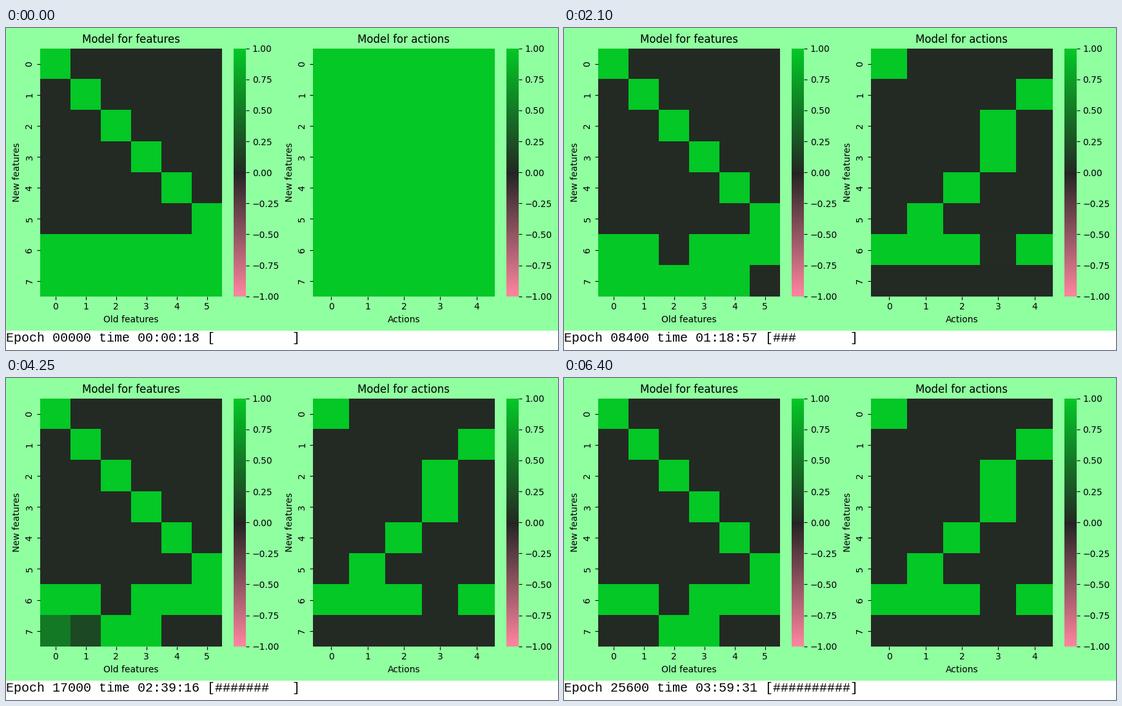
A matplotlib script that plays this animation: 856 by 500 pixels, repeating every 6450 ms.

```python
import numpy as np
import matplotlib.pyplot as plt
from matplotlib.animation import FuncAnimation
from matplotlib.colors import LinearSegmentedColormap
from matplotlib.patches import Rectangle

W, H, DPI = 856, 500, 100
FRAMES, STEP_MS = 129, 50
EPOCHS_PER_FRAME = 200
STRIP = 30                   # height of the white status strip
TOP, BOTTOM = 31.71, 416.71  # vertical extent of both heatmaps
MAP_W, BAR_GAP, BAR_W = 282, 17.6, 19.25
LIMIT = 5.0                  # gates saturate at this logit

CMAP = LinearSegmentedColormap.from_list(
    "gate", [(0, "#ff85a0"), (0.498, "#242423"), (0.5, "#232923"), (1, "#03c826")]
)
plt.rcParams["font.family"] = "DejaVu Sans"

# Feature gates that close: (row, column) -> step at which they are half shut.
CLOSING = {(6, 2): 23, (7, 5): 18, (7, 0): 85, (7, 1): 80.6, (7, 4): 70}
CLOSE_RATE = 0.32

# The action that stays open in rows 0 to 5, and how far the others
# have closed by the checkpoint, row by row.
OPEN_ACTION = [0, 4, 3, 3, 2, 1]
CHECKPOINT = 12
ROW_LEVEL = np.array([0.26, 0.18, 0.36, 0.34, 0.25, 0.35, 0.80, 0.19])

# Wall clock in seconds at a few steps.
CLOCK = (
    (0, 12, 25, 59, 77, 98, 128),
    (18, 1372, 2833, 6641, 8660, 11011, 14371),
)


def logit(p):
    p = np.clip(p, 1e-6, 1 - 1e-6)
    return np.clip(np.log(p / (1 - p)), -LIMIT, LIMIT)


def gate(z):
    """Logistic curve rescaled so that it reaches 0 and 1 at the limits."""
    p = 1 / (1 + np.exp(-np.clip(z, -LIMIT, LIMIT)))
    lo = 1 / (1 + np.exp(LIMIT))
    return (p - lo) / (1 - 2 * lo)


noise = np.random.default_rng(4).normal(0, 0.15, (8, 5))
SLOPE = (logit(ROW_LEVEL)[:, None] + noise - LIMIT) / CHECKPOINT


def features_at(n):
    values = np.vstack([np.eye(6), np.ones((2, 6))])
    for cell, half in CLOSING.items():
        values[cell] = gate(CLOSE_RATE * (half - n))
    return values


def actions_at(n):
    values = gate(LIMIT + n * SLOPE)
    values[range(6), OPEN_ACTION] = 1
    # Row 6 dips, then all its gates but one open again.
    for col in range(5):
        dip = (0.88, 0.96) if col in (0, 2) else (0.75, 0.58)
        path = logit(np.array([1, *dip, col != 3], float))
        values[6, col] = gate(np.interp(n, (0, CHECKPOINT, 25, 45), path))
    return values


def status(n):
    t = int(round(np.interp(n, *CLOCK)))
    clock = f"{t // 3600:02d}:{t // 60 % 60:02d}:{t % 60:02d}"
    bar = "#" * int(round(10 * n / (FRAMES - 1)))
    return f"Epoch {n * EPOCHS_PER_FRAME:05d} time {clock} [{bar:<10}]"


def pixel_axes(fig, x, width):
    return fig.add_axes([x / W, 1 - BOTTOM / H, width / W, (BOTTOM - TOP) / H])


def heatmap(fig, x, values, title, xlabel):
    rows, cols = values.shape
    ax = pixel_axes(fig, x, MAP_W)
    mesh = ax.pcolormesh(values, cmap=CMAP, vmin=-1, vmax=1, snap=False)
    ax.set(xlim=(0, cols), ylim=(rows, 0), title=title,
           xlabel=xlabel, ylabel="New features")
    ax.set_xticks(np.arange(cols) + 0.5, range(cols))
    ax.set_yticks(np.arange(rows) + 0.5, range(rows), rotation=90, va="center")
    ax.spines[:].set_visible(False)

    cax = pixel_axes(fig, x + MAP_W + BAR_GAP, BAR_W)
    ticks = np.linspace(-1, 1, 9)
    bar = fig.colorbar(mesh, cax=cax, ticks=ticks)
    bar.ax.set_yticklabels([f"{v:.2f}".replace("-", "\u2212") for v in ticks])
    bar.outline.set_visible(False)
    return mesh


fig = plt.figure(figsize=(W / DPI, H / DPI), dpi=DPI, facecolor="white")
fig.add_artist(Rectangle((0, STRIP / H), 1, 1 - STRIP / H,
                         transform=fig.transFigure, facecolor="#90ffa0",
                         edgecolor="none", zorder=-1))
features = heatmap(fig, 53.2, features_at(0), "Model for features", "Old features")
actions = heatmap(fig, 475.95, actions_at(0), "Model for actions", "Actions")
line = fig.text(0, 13 / H, status(0), family="Liberation Mono",
                size=20 * 72 / DPI, va="baseline", color="black")


def update(n):
    features.set_array(features_at(n))
    actions.set_array(actions_at(n))
    line.set_text(status(n))
    return features, actions, line


anim = FuncAnimation(fig, update, frames=FRAMES, interval=STEP_MS,
                     repeat=True, repeat_delay=0, blit=False)
plt.show()
```
